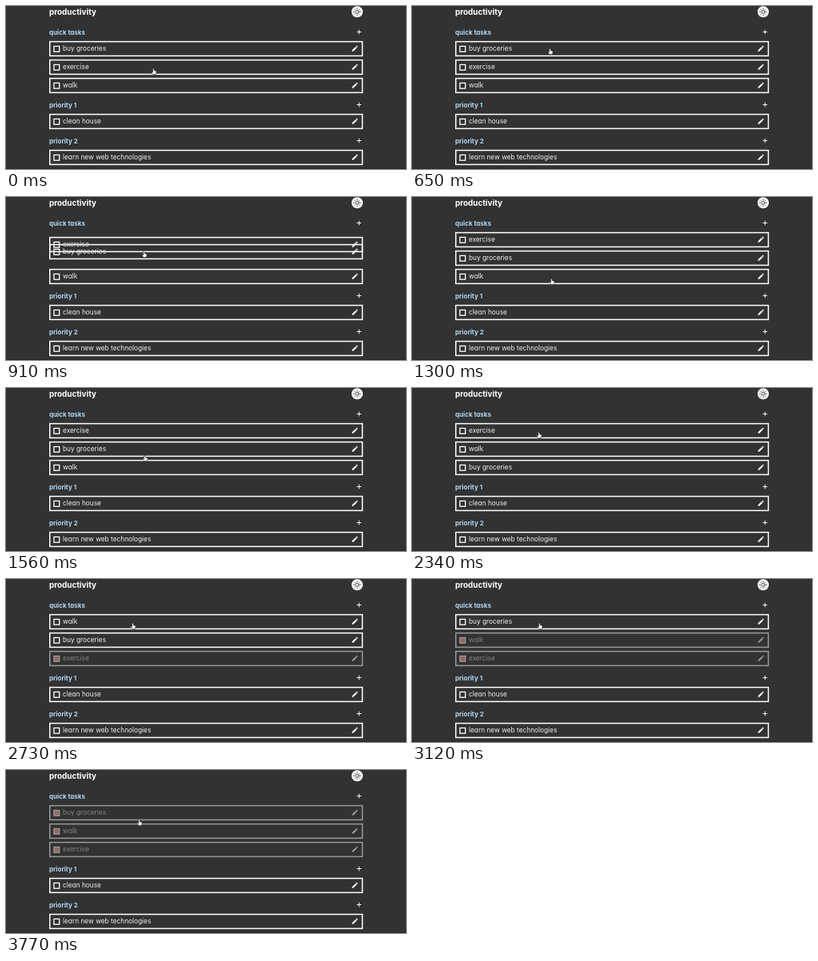
Animation, 500 px wide and 204 px high, one loop 3.9 s. Source, as an HTML page:

```html
<!DOCTYPE html>
<html lang="en">
<head>
<meta charset="utf-8">
<title>Task list</title>
<style>
  html, body { margin: 0; width: 100%; height: 100%; overflow: hidden; background: #323232; }
  svg { display: block; width: 100vw; height: 100vh; }
  text { font-family: Inter, "Open Sans", sans-serif; font-feature-settings: "cv11"; fill: #f0f0f0; font-size: 8.3px; }
  .title { font-size: 9.9px; font-weight: 700; fill: #fff; }
  .group { font-size: 8px; font-weight: 700; fill: #b0d6f2; }
  .frame { fill: none; stroke: #fff; stroke-width: 1.5; }
  .check { fill: none; stroke: #fff; stroke-width: 1.3; }
  .done { opacity: .5; }
  .done .check { fill: #f59c9a; }
  .done text { opacity: .85; }
  .plus { fill: none; stroke: #f4f4f4; stroke-width: 1; }
  .sun { fill: none; stroke: #333; stroke-width: .9; stroke-linecap: round; }
</style>
</head>
<body>
<svg id="stage" viewBox="0 0 500 204" preserveAspectRatio="none">
  <rect width="500" height="204" fill="#323232"/>
  <rect y="203" width="500" height="1" fill="#2b2829"/>
  <text class="title" x="54" y="10.8">productivity</text>
  <circle cx="439" cy="7.2" r="7" fill="#fff"/>
  <g class="sun" transform="translate(439 7.2)">
    <circle r="2.1"/>
    <path id="rays"/>
  </g>
  <g id="groups"></g>
  <g id="rows"></g>
  <path id="hand" fill="#fff" stroke="#222" stroke-width=".6" stroke-linejoin="round"
    d="M-1.6 -3.4Q-.7 -4.3 0 -3.3L.4 -1.2L2.2 -.8Q3.2 -.5 3 .6L2.5 3.4H-1.2L-3 .9Q-3.1 0 -2.2 .1L-1.2 .8Z"/>
</svg>
<script>
const LOOP = 3900, STEP = 130;
const SLOTS = [53.5, 76.5, 99.5];
const PENCIL = "M3 17.25V21h3.75L17.81 9.94l-3.75-3.75L3 17.25zM20.71 7.04c.39-.39.39-1.02 0-1.41" +
  "l-2.34-2.34c-.39-.39-1.02-.39-1.41 0l-1.83 1.83 3.75 3.75 1.83-1.83z";
const $ = id => document.getElementById(id);

function add(parent, tag, attrs, label) {
  const node = document.createElementNS("http://www.w3.org/2000/svg", tag);
  for (const key in attrs) node.setAttribute(key, attrs[key]);
  if (label) node.textContent = label;
  return parent.appendChild(node);
}

const place = (node, x, y) => node.setAttribute("transform", `translate(${x} ${y})`);

// A row is drawn around its vertical centre.
function addRow(label, y) {
  const row = add($("rows"), "g", {});
  add(row, "rect", { class: "frame", x: 54.75, y: -8.9, width: 390.7, height: 17.8 });
  add(row, "rect", { class: "check", x: 59.9, y: -3.1, width: 6.8, height: 6.8 });
  add(row, "text", { x: 71, y: 2.6 }, label);
  add(row, "path", { d: PENCIL, fill: "#fff", transform: "translate(431.4 -5.1) scale(.4)" });
  place(row, 0, y);
  return row;
}

function addGroup(label, y) {
  add($("groups"), "text", { class: "group", x: 54, y: y + 2.8 }, label);
  add($("groups"), "path", { class: "plus", d: `M438.5 ${y - .5}h5.6M441.3 ${y - 3.3}v5.6` });
}

let rays = "";
for (let i = 0; i < 8; i++) {
  const a = i * Math.PI / 4, c = Math.cos(a), s = Math.sin(a);
  rays += `M${c * 3.7} ${s * 3.7}L${c * 4.6} ${s * 4.6}`;
}
$("rays").setAttribute("d", rays);

addGroup("quick tasks", 33);
addGroup("priority 1", 124);
addGroup("priority 2", 169);
addRow("clean house", 144.5);
addRow("learn new web technologies", 189.5);

const tasks = [
  { row: addRow("buy groceries"), doneAt: 3640 },
  { row: addRow("exercise"), doneAt: 2600 },
  { row: addRow("walk"), doneAt: 3120 }
];

const [top1, mid, low] = SLOTS;
// start time, row centres of the three tasks
const layout = [
  [0, top1, mid, low],
  [780, 58.5, mid, low],
  [910, 68.5, 59.5, low],
  [1040, 75.5, 54, low],
  [1170, mid, top1, low],
  [1690, 79.5, top1, low],
  [1820, 89.5, top1, 85.5],
  [1950, low, top1, mid],
  [2600, mid, low, top1],
  [3120, top1, low, mid]
];
// start time, pointer position
const pointer = [
  [0, 185, 82], [260, 182, 74], [390, 178, 65], [520, 175, 59], [650, 173, 57],
  [780, 173, 62], [910, 173, 72], [1040, 173, 79], [1170, 174, 92], [1300, 175, 106],
  [1560, 174, 88], [1690, 173, 81], [1820, 173, 91], [1950, 172, 101],
  [2210, 166, 80], [2340, 159, 59], [3120, 160, 59], [3640, 161, 60], [3770, 167, 66]
];

const at = (keys, t) => keys.findLast(key => key[0] <= t);

function draw(ms) {
  const t = Math.floor(ms % LOOP / STEP) * STEP;
  const [, ...centres] = at(layout, t);
  tasks.forEach(({ row, doneAt }, i) => {
    place(row, 0, centres[i]);
    row.classList.toggle("done", t >= doneAt);
  });
  const [, x, y] = at(pointer, t);
  place($("hand"), x, y);
}

const start = performance.now();
function tick() {
  draw(performance.now() - start);
  requestAnimationFrame(tick);
}
tick();
</script>
</body>
</html>
```
